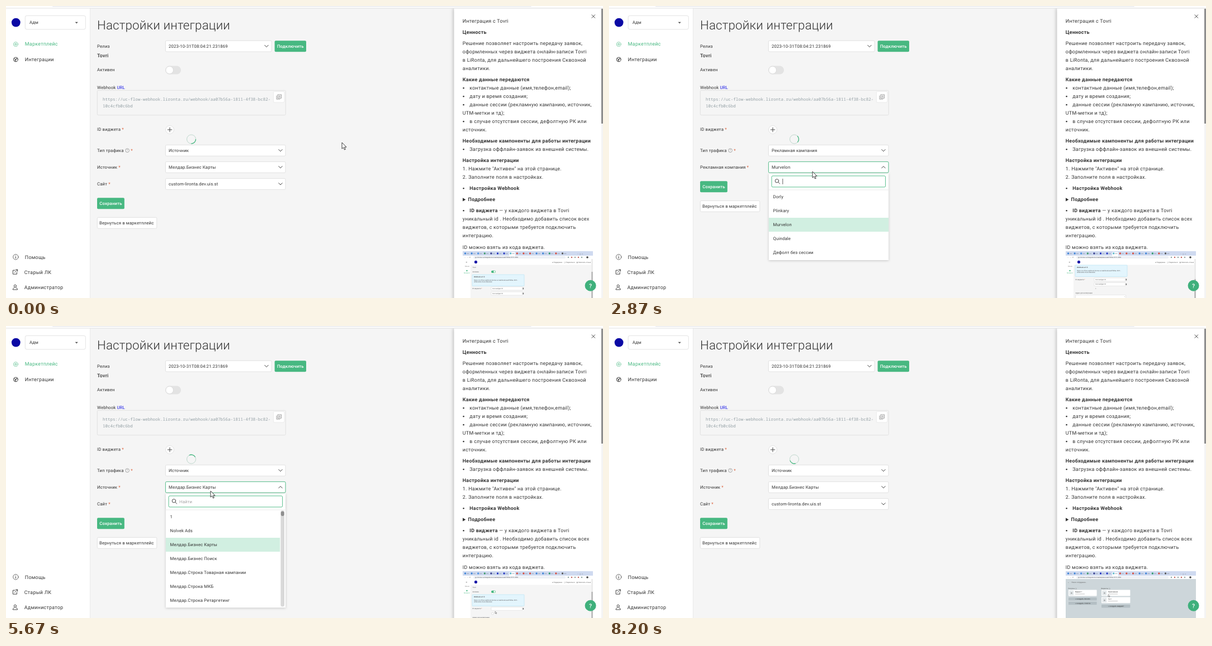
An HTML page that plays this animation: 1068x524 px, repeating every 8270 ms.

```html
<!DOCTYPE html>
<html lang="ru">
<head>
<meta charset="utf-8">
<title>Настройки интеграции</title>
<style>
html, body { margin: 0; width: 100%; height: 100%; overflow: hidden; background: #f5f5f5; }
svg { display: block; width: 100vw; height: 100vh; }
text { font-family: Roboto, Arial, sans-serif; fill: #333; white-space: pre; text-rendering: geometricPrecision; }
.s { font-size: 7.79px; letter-spacing: .139px; }
.m { font-size: 8.9px; letter-spacing: .278px; }
.h { font-size: 22.25px; font-weight: 300; letter-spacing: .2px; }
.code { font: 7.47px "Noto Sans Mono", monospace; fill: #95a1a6; }
.tiny { font-size: 2.9px; }
.b { font-weight: 700; }
.md { font-weight: 500; }
.w { fill: #fff; }
.g { fill: #47b881; }
.gray { fill: #a5a5a5; }
.req { fill: #d9542b; }
.box { fill: #fff; stroke: #dcdcdc; stroke-width: .8; }
.focus { fill: #fff; stroke: #47b881; stroke-width: .9; }
.line { fill: none; stroke: #444; stroke-width: 1; stroke-linecap: round; stroke-linejoin: round; }
.menu { fill: #fff; filter: drop-shadow(0 1px 2px #0003); }
</style>
</head>
<body>
<svg id="stage" viewBox="0 0 1068 524" preserveAspectRatio="none"></svg>
<script>
const LOOP = 8270;
const stage = document.getElementById('stage');

// Markup helpers
const text = (x, y, str, cls = 's') => `<text x="${x}" y="${y}" class="${cls}">${str}</text>`;
const rect = (x, y, w, h, attrs = '', r = 0) => `<rect x="${x}" y="${y}" width="${w}" height="${h}" rx="${r}" ${attrs}/>`;
const disc = (x, y, r, attrs = '') => `<circle cx="${x}" cy="${y}" r="${r}" ${attrs}/>`;
const path = (d, attrs = 'class="line"') => `<path d="${d}" ${attrs}/>`;
const fill = c => `fill="${c}"`;
const shift = (dx, dy, inner) => `<g transform="translate(${dx} ${dy})">${inner}</g>`;
const on = (times, inner) => `<g data-on="${times}">${inner}</g>`;
const star = '<tspan class="req"> *</tspan>';

const chevron = (x, y, up) => {
  const d = up ? 1.7 : -1.7;
  return path(`M${x - 3.2} ${y + d}L${x} ${y - d}L${x + 3.2} ${y + d}`);
};

function select(y, value, open = '', right = 500) {
  const box = (cls, up) => rect(285.4, y - 9.8, right - 285.4, 19.8, `class="${cls}"`, 2) + chevron(right - 9, y, up);
  return box('box', false) + (open && on(open, box('focus', true))) + value;
}

const spinner = (x, y) => shift(x, y,
  disc(0, 0, 8, 'fill="none" stroke="#bfd8cd" stroke-width="1"') +
  path('M0 -8A8 8 0 0 1 8 0', 'class="spin" fill="none" stroke="#47b881" stroke-width="1.3"'));

function options(y, items, chosen, hover = -1, width = 214.4) {
  return items.map((item, i) => {
    const top = y + i * 25;
    const tint = i === chosen ? '#d1efe1' : i === hover ? '#e9f7f0' : '';
    return (tint && rect(285.8, top, width, 25, fill(tint))) + text(293.5, top + 15.2, item);
  }).join('');
}

function searchMenu(y, from, to, height, list) {
  const ready = from + 100;
  return on(`${from}-${to}`,
    rect(285.8, y, 214.4, height, 'class="menu"') +
    rect(291, y + 4.5, 203.6, 20, 'class="focus"', 2) +
    disc(300.4, y + 13.4, 3.2, 'class="line"') + path(`M302.8 ${y + 15.8}l2.8 2.8`) +
    on(`${from}-${ready}`, text(310, y + 17.2, 'Найти', 's gray')) +
    on(`${ready}-${to}`, path(`M310.8 ${y + 9.5}v10`, 'stroke="#333" stroke-width=".8"')) +
    path(`M286 ${y + 29.6}h214`, 'stroke="#e6e6e6" stroke-width=".8"') + list);
}

const button = (x, y, w, label) => rect(x, y, w, 20, 'class="g"', 2) + text(x + 4.3, y + 12.8, label, 's md w');

const actions = dy => shift(0, dy,
  button(163, 344.3, 48.8, 'Сохранить') +
  rect(163.3, 379.4, 106.4, 19.8, 'class="box"', 2) + text(167, 392.1, 'Вернуться в маркетплейс'));

// Page parts
function sidebar() {
  const item = (y, label, cls = 'm') => text(33.8, y + 3.2, label, cls);
  return rect(0, 0, 150, 524, fill('#fff')) + rect(150, 4, .8, 520, fill('#e6e6e6')) +
    disc(17.8, 29.6, 7.9, fill('#0b09a4')) +
    rect(34.3, 17.3, 108, 24.6, 'class="box"', 3) + text(42, 32.3, 'Адм') + path('M123.6 28.7h5.2l-2.6 2.8z', fill('#555')) +
    disc(17.4, 68.6, 3.9, 'fill="none" stroke="#47b881" stroke-dasharray="1.8 .65"') + disc(17.4, 68.6, 1.5, 'fill="none" stroke="#47b881" stroke-width=".9"') +
    item(68, 'Маркетплейс', 'm g') +
    disc(17.4, 96, 3.9, 'class="line"') + path('M14.4 94l3 2 3 -2M17.4 96v3.6M15 98.6l4.8 -5.2') +
    item(96, 'Интеграции') +
    disc(17.4, 450.4, 4.7, 'class="line" style="stroke-width:.8"') + path('M17.4 449.8v3M17.4 447.9v.1') + item(450.3, 'Помощь') +
    path('M16 474.2h-3.6v7h7v-3.4M17.4 473h3.2v3.2M20.4 473.2l-5 5') + text(32.8, 480.7, 'Старый ЛК', 'm') +
    disc(16.4, 502.4, 2.1, 'class="line"') + path('M15.4 504.4c0 2 -3.2 1.4 -3.2 4.6h8.4c0 -3.2 -3.2 -2.6 -3.2 -4.6') + text(32.8, 508.4, 'Администратор', 'm');
}

function form() {
  const brand = 'Мелдар.Бизнес Карты';
  const value = (y, str) => text(291, y + 2.8, str);
  const sources = ['1', 'Nolvek Ads', brand, 'Мелдар.Бизнес Поиск', 'Мелдар.Строка Товарная кампании',
    'Мелдар.Строка МКБ', 'Мелдар.Строка Ретаргетинг'];
  const kinds = ['Источник', 'Рекламная кампания'];
  const kindMenu = (times, chosen) => on(times,
    rect(285.8, 270, 214.4, 50.4, 'class="menu"') + options(270, kinds, chosen, 1 - chosen));

  return text(163, 42, 'Настройки интеграции', 'h') +
    text(163, 74.7, 'Релиз') + select(72, value(72, '2023-10-31T08:04:21.231869'), '', 475) + button(480.6, 62.3, 56.4, 'Подключить') +
    text(163, 91.7, 'Tovri', 'm md') +
    text(163, 117.2, 'Активен') + rect(285, 107.6, 28, 14.8, fill('#e3e3e3'), 7.4) + disc(292.6, 115, 6.8, 'fill="#fff" stroke="#d2d2d2" stroke-width=".7"') +
    text(163, 148.6, 'Webhook <tspan fill="#1414e6">URL</tspan>') +
    rect(163.3, 151.4, 337, 44.4, 'fill="#f5f5f5" stroke="#dedede" stroke-width=".8"', 2) +
    text(173, 169.6, 'https://uc-flow-webhook.lironta.ru/webhook/aa07b56a-1811-4f38-bc82-', 'code') +
    text(173, 181.8, '10c4cfb0c6bd', 'code') +
    rect(478.4, 153.4, 19.6, 19.6, 'class="box" style="stroke:#e6e6e6"', 2) +
    path('M486 159h6.6v6.4h-6.6zM484 160.8v6.4h6.6M487.4 161.4h3.8M487.4 163.2h3.8', 'fill="none" stroke="#888" stroke-width=".8"') +
    text(163, 224.3, 'ID виджета' + star) + disc(293, 222, 7.4, 'class="box"') + path('M289.2 222h7.6M293 218.2v7.6') +
    spinner(331.5, 239) +

    text(163, 262, 'Тип трафика') + disc(217, 259.2, 3.4, 'fill="none" stroke="#888" stroke-width=".7"') +
    text(215.5, 261.2, '?', 'gray" style="font-size:5.5px') + text(221.2, 262, star) +
    select(259.2, on('0-1690 4180-8270', value(259.2, kinds[0])) + on('1690-4180', value(259.2, kinds[1])), '800-1930 3470-4250') +

    on('0-1700 4200-8270',
      text(163, 292, 'Источник' + star) +
      select(289.2, on('0-1700 4520-8270', value(289.2, brand)) + on('4200-4520', spinner(393, 289.2)), '5600-6010')) +
    on('0-1700 4360-8270',
      text(163, 322, 'Сайт' + star) +
      select(319.3, on('0-1700 4650-8270', value(319.3, 'custom-lironta.dev.uis.st')) + on('4360-4650', spinner(393, 319.3)), '6530-7010')) +
    on('1700-4200',
      text(163, 292, 'Рекламная компания' + star) +
      select(289.2, on('1700-2070', spinner(393, 289.2)) + on('2070-4200', value(289.2, 'Murvelon')), '2470-3160')) +
    on('0-1780 4360-8270', actions(0)) + on('1780-4360', actions(-30)) +

    kindMenu('830-1690', 0) + kindMenu('3500-4180', 1) +
    searchMenu(300.4, 2500, 3130, 155.6, options(330, ['Dorly', 'Plinkary', 'Murvelon', 'Quindale', 'Дефолт без сессии'], 2)) +
    searchMenu(300.4, 5630, 5980, 205, options(330, sources, 2, -1, 204.4) +
      rect(491.4, 331, 6.6, 172.5, fill('#d9d9d9'), 3) + rect(491.8, 332.6, 5.8, 8.4, fill('#8e8e8e'), 2.9)) +
    searchMenu(330.4, 6560, 6980, 130.4, options(360, ['lirontaopr.tilda.ws', 'custom-lironta.dev.uis.st', 'custom.lironta.ru', 'yclients.com'], 1));
}

// Small screen recording at the foot of the help panel
function preview() {
  const tiny = (x, y, str, color = '#555') => `<text x="${x}" y="${y}" class="tiny" style="fill:${color}">${str}</text>`;
  const tones = ['#3b82d6', '#3b82d6', '#4a90e2', '#3c9a66', '#333a8c', '#1f2fbf', '#1f2fbf', '#5ab7c9', '#d64b3b', '#d64b3b', '#d64b3b', '#3b82d6', '#3b82d6', '#2f9a6a', '#d64b3b', '#555'];
  const chrome = rect(817, 440, 233, 8, fill('#cfdaf0')) + rect(900, 441.4, 11, 6.6, fill('#fff'), 1) +
    tones.map((c, i) => rect(820 + i * 11.6, 442.6, 3, 3, fill(c), .8) + rect(824 + i * 11.6, 443.8, 4.4, .8, fill('#8a94a8'))).join('') +
    tiny(1022, 445.6, '–   ◻   ×') +
    rect(817, 448, 233, 6, fill('#fff')) + tiny(820, 452.2, '←  →  ⟳') + rect(836, 448.8, 165, 4.4, fill('#eef1f6'), 2) +
    [1006, 1012, 1018, 1024, 1030].map((x, i) => disc(x, 451, 1.2, fill(i % 2 ? '#c0605a' : '#8aa2a0'))).join('') + disc(1040, 451, 1.8, fill('#444'));
  const field = y => rect(868, y - 3, 56, 6, 'fill="#fff" stroke="#ccc" stroke-width=".4"', .6) + rect(924.4, y - 1.4, 1.8, 2.8, fill('#777'));
  const filled = y => field(y) + tiny(870, y + 1, 'tovri-widget-10');
  const hook = y => rect(834, y, 93, 20.5, 'fill="#e3f5fd" stroke="#a5dcf2" stroke-width=".5"', .8) +
    tiny(837, y + 4.8, '<tspan font-weight="700">Webhook url ①</tspan>') +
    tiny(837, y + 10.6, 'https://uc-flow-webhook.lironta.ru/webhook/aa07b56a-1811-') + tiny(837, y + 14.2, '4f38-bc82-10c4cfb0c6bd');
  const label = y => tiny(834.5, y + 1, 'ID виджета <tspan fill="#d9542b">*</tspan>');
  const site = y => tiny(834.5, y, 'Адрес для интеграции') + rect(834.5, y + 3, 90, 6, 'fill="#fff" stroke="#ccc" stroke-width=".4"', .6) + tiny(921, y + 6.6, '⌄');
  const shell = rect(817, 454, 233, 70, fill('#fff')) + rect(831, 464.5, 216, 60, fill('#f5f5f5')) +
    disc(840.5, 459.4, 2.6, fill('#1a18a8')) + tiny(822.5, 460.6, '☰') + tiny(821, 468, 'Меню', '#888') +
    disc(824.5, 475, 1.2, fill('#47b881')) + tiny(819, 480, 'Каталог', '#47b881') +
    tiny(977, 460.5, '● Поддержка    ▢ Поделиться    ▤ Написать отзыв') +
    rect(1047, 454, 3, 70, fill('#ececec'));
  const top = tiny(834.5, 470.4, 'Tovri') + tiny(834.5, 478, 'Активен') +
    rect(868, 474.8, 8, 4.2, fill('#47b881'), 2.1) + disc(873.8, 476.9, 1.6, fill('#fff')) +
    hook(482) + label(507) + rect(1047.3, 477, 2.4, 47, fill('#b5b5b5'));
  const lower = hook(465) + label(491) + filled(491) + filled(499.4) +
    tiny(870, 508, '+') + site(515.6) + rect(1047.3, 490, 2.4, 34, fill('#b5b5b5'));

  const card = (x, y, w, str) => rect(x, y, w, 10.8, fill('#fff'), .8) + rect(x + 1.2, y + 1.2, 8, 8.4, fill('#e4e9eb')) + tiny(x + 4, y + 6.4, '▤') + tiny(x + 12, y + 4.8, str, '#222') + rect(x + 12, y + 7, 17, .7, fill('#aaa'));
  const bar = (x, y, w, str) => rect(x, y, w, 5.4, fill('#b4bfc4'), .6) + tiny(x + 12, y + 3.8, str, '#333');
  const admin = rect(817, 454, 233, 70, fill('#cdd6da')) + tiny(820.5, 461, '←', '#111') + tiny(827.5, 461, 'Поиск сотрудника...') +
    tiny(821.5, 471.6, 'Ресурсы ⓘ') + tiny(880.5, 471.6, 'Виджеты ⓘ') +
    card(822, 473.6, 50.6, 'Виджет 1') + bar(822, 487.2, 50.6, '+ СОЗДАТЬ РЕСУРС') + bar(822, 494.8, 50.6, '+ СОЗДАТЬ ГРУППУ') +
    card(881, 473.6, 51.4, 'Приложение') + card(881, 486.4, 51.4, 'Тест') + bar(881, 500, 51.4, '+ СОЗДАТЬ ВИДЖЕТ');

  return '<g clip-path="url(#shot)">' + chrome + tiny(839, 452.2, 'go.lironta.ru/integrations/marketplace/aa07b56a-1811-4f38') +
    on('0-560 3000-4550 4950-6870', shell + top) +
    on('0-560', filled(507) + filled(516)) +
    on('560-3000', shell + lower) +
    on('3000-4550', site(516)) +
    on('4950-6870', field(507.4) + disc(870.5, 516, 2, 'fill="#fff" stroke="#bbb" stroke-width=".4"') + site(524)) +
    on('4550-4950 6870-8270', admin) +
    on('3000-8270', '<g id="mini">' + path('M0 0v4l1 -.9 .8 1.5 .7 -.4 -.7 -1.4h1.3z', 'fill="#fff" stroke="#222" stroke-width=".4"') + '</g>') + '</g>';
}

function panel() {
  const lines = [
    [27, 'Интеграция с Tovri'], [47, '**Ценность**'],
    [67, 'Решение позволяет настроить передачу заявок,'], [82, 'оформленных через виджета онлайн-записи Tovri'],
    [97, 'в LiRonta, для дальнейшего построения Сквозной'], [112, 'аналитики.'],
    [132, '**Какие данные передаются**'], [147, '• контактные данные (имя,телефон,email);'],
    [162, '• дату и время создания;'], [177, '• данные сессии (рекламную кампанию, источник,'],
    [192, 'UTM-метки и тд);'], [207, '• в случае отсутствия сессии, дефолтную РК или'], [222, 'источник.'],
    [242, '**Необходимые кампоненты для работы интеграции**'], [257, '• Загрузка оффлайн-заявок из внешней системы.'],
    [277, '**Настройка интеграции**'], [292, '1. Нажмите "Активен" на этой странице.'], [307, '2. Заполните поля в настройках.'],
    [327, '• **Настройка Webhook**'], [367, '• **ID виджета** — у каждого виджета в Tovri'],
    [382, 'уникальный id . Необходимо добавить список всех'], [397, 'виджетов, с которыми требуется подключить'],
    [412, 'интеграцию.'], [432.5, 'ID можно взять из кода виджета.']
  ];
  const row = ([y, str]) => {
    const bullet = str.startsWith('• ');
    const rich = str.replace('• ', '').replace(/\*\*(.+?)\*\*/, '<tspan class="b">$1</tspan>');
    return (bullet ? disc(818.6, y + .3, 1.3, fill('#333')) : '') + text(bullet ? 829.3 : 816.8, y + 3.2, rich, 'm');
  };
  return rect(801.5, 4, 264, 530, 'fill="#fff" style="filter:drop-shadow(-1px 0 3px #0004)"') +
    lines.map(row).join('') +
    path('M817 344.2l5.4 3.2l-5.4 3.2z', fill('#333')) + text(826.6, 350.4, 'Подробнее', 'm b') +
    path('M1048 15.8l5.6 5.6M1053.6 15.8l-5.6 5.6') +
    preview() +
    rect(1064.8, 4, 3.2, 520, fill('#f4f4f4')) + rect(1064.9, 5, 3.1, 206, fill('#8f8f8f')) +
    disc(1045.6, 501.8, 10, fill('#3fb07c')) + text(1042.9, 505.5, '?', 'w md" style="font-size:10.5px');
}

function pointer() {
  const look = 'fill="#fff" stroke="#111" stroke-width=".8" stroke-linejoin="round"';
  return '<g id="cursor">' +
    on('0-1150 1700-3600 4180-6350 7050-8080', path('M0 0V11.2L2.6 8.8 4.5 13 6.3 12.2 4.5 8.2H8Z', look)) +
    on('1150-1700 3600-4180', path('M-1.2 .8Q0 -.8 1.2 .8V5Q2.4 4.2 3.4 5.4Q4.6 4.8 5.4 6Q7 5.6 7 7.4V10Q7 12.5 5.6 15H-.6Q-2 12 -4 9.4Q-4.4 7.6 -2.8 8L-1.2 9.4Z', look)) +
    on('6350-7050', path('M-2 -5Q0 -5 0 -4Q0 -5 2 -5M0 -4V4M-2 5Q0 5 0 4Q0 5 2 5', 'fill="none" stroke="#111" stroke-width=".9"')) + '</g>';
}

stage.innerHTML = '<clipPath id="shot">' + rect(817, 440, 233, 84) + '</clipPath>' +
  rect(0, 0, 1068, 524, fill('#f5f5f5')) + sidebar() + form() + panel() +
  rect(0, 0, 1068, 3.6, fill('#fff')) + rect(83, 0, 857, 1.2, fill('#e4e6ea'), .6) + rect(0, 3.5, 1068, .9, fill('#dedede')) +
  pointer();

// Timeline: [ms, x, y]
const cursorPath = [
  [0, 601, 245], [120, 601, 245], [720, 372, 255], [850, 370, 257], [1350, 355, 302], [1650, 354, 305], [1850, 354, 305],
  [2350, 364, 294], [2500, 364, 297], [3100, 364, 297], [3420, 366, 258], [3540, 366, 259], [3850, 365, 278], [4200, 365, 279],
  [5000, 368, 300], [5500, 366, 296], [5950, 366, 296], [6400, 364, 321], [7000, 364, 322], [7300, 270, 390],
  [7620, 8, 470], [7830, 148, 500], [8070, 190, 528]
];
const miniPath = [
  [3000, 872, 476], [3400, 872, 478], [3870, 892, 514], [4330, 892, 514], [4550, 904, 445], [4950, 896, 505],
  [5650, 875, 512], [6100, 875, 512], [6700, 903, 444], [6870, 903, 444], [7300, 893, 482]
];

function place(points, t) {
  const next = points.findIndex(p => p[0] > t);
  if (next < 1) return points[next ? points.length - 1 : 0].slice(1);
  const [a, b] = [points[next - 1], points[next]];
  const u = (t - a[0]) / (b[0] - a[0]);
  const k = u * u * (3 - 2 * u);
  return [a[1] + (b[1] - a[1]) * k, a[2] + (b[2] - a[2]) * k];
}

const timed = [...stage.querySelectorAll('[data-on]')].map(el => ({
  el, spans: el.dataset.on.split(' ').map(s => s.split('-').map(Number))
}));
const arcs = stage.querySelectorAll('.spin');
const movers = [['cursor', cursorPath], ['mini', miniPath]].map(([id, points]) => [document.getElementById(id), points]);

function draw() {
  const t = performance.now() % LOOP;
  for (const { el, spans } of timed) {
    el.style.display = spans.some(([a, b]) => t >= a && t < b) ? '' : 'none';
  }
  for (const arc of arcs) arc.setAttribute('transform', `rotate(${90 + t * .36})`);
  for (const [el, points] of movers) el.setAttribute('transform', `translate(${place(points, t)})`);
  requestAnimationFrame(draw);
}
draw();
</script>
</body>
</html>
```
